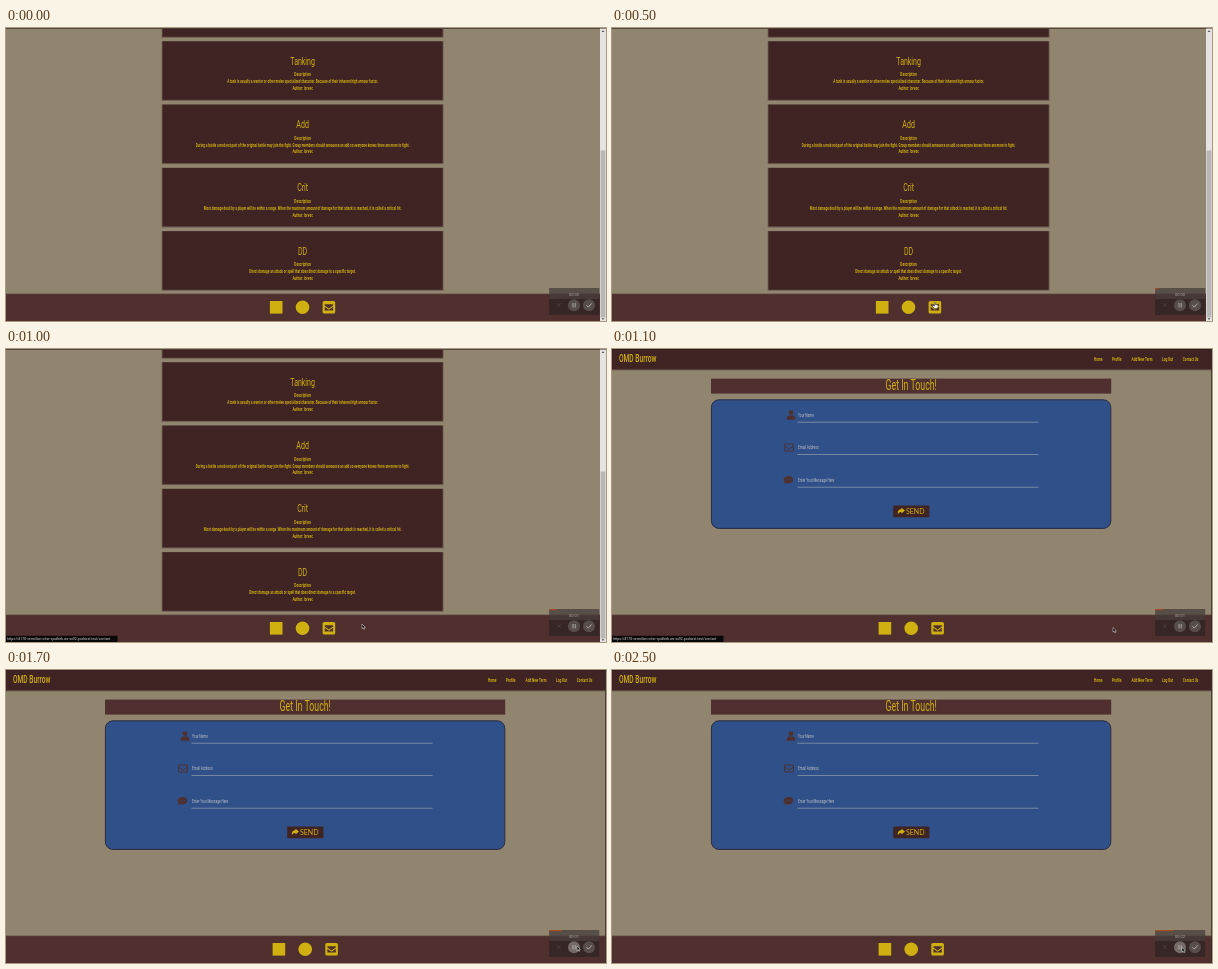
An HTML page for the animation above (2600 ms loop, 600 by 293 pixels).

```html
<!DOCTYPE html>
<html lang="en">
<head>
<meta charset="utf-8">
<title>Glossary and contact page</title>
<style>
html, body { margin: 0; width: 100%; height: 100%; overflow: hidden; background: #918570; }
svg { display: block; width: 100vw; height: 100vh; }
text { font-family: Roboto, "Liberation Sans", sans-serif; }
</style>
</head>
<body>
<svg id="stage" viewBox="0 0 600 293" preserveAspectRatio="none"></svg>
<script>
const LOOP = 2600, STEP = 100, PAGE_CHANGE = 1100;
const GOLD = '#d0b010', DARK = '#402424', BROWN = '#4f302e', TAN = '#918570';
const NARROW = 0.62; // one ratio for the condensed face

const rect = (x, y, w, h, fill, extra = '') =>
  `<rect x="${x}" y="${y}" width="${w}" height="${h}" fill="${fill}" ${extra}/>`;
const path = (d, extra) => `<path d="${d}" ${extra}/>`;
const label = (x, y, size, str, { fill = GOLD, weight = 400, anchor = 'middle' } = {}) =>
  `<text transform="translate(${x} ${y}) scale(${NARROW} 1)" font-size="${size}" font-weight="${weight}"
    fill="${fill}" text-anchor="${anchor}">${str}</text>`;

function footer(cx) {
  return rect(0, 266, 600, 27, BROWN) + rect(0, 265.6, 600, 0.7, '#5d463e')
    + rect(cx - 32.6, 273, 12.6, 12.6, GOLD)
    + `<circle cx="${cx}" cy="279.2" r="6.8" fill="${GOLD}"/>`
    + rect(cx + 20.1, 273, 12.6, 12.6, GOLD, 'rx="1.6"')
    + path(`M${cx + 22.2} 276.2h8.4v1.3l-4.2 2.9l-4.2-2.9z M${cx + 22.2} 278.8l4.2 2.9l4.2-2.9v3.7h-8.4z`,
      `fill="${BROWN}"`);
}

const terms = [
  ['Tanking', 'A tank is usually a warrior or other melee specialized character. Because of their inherent high armour factor.'],
  ['Add', 'During a battle a mob not part of the original battle may join the fight. Group members should announce an add so everyone knows there are more to fight.'],
  ['Crit', 'Most damage dealt by a player will be within a range. When the maximum amount of damage for that attack is reached, it is called a critical hit.'],
  ['DD', 'Direct damage an attack or spell that does direct damage to a specific target.']
];

function card(y, h) {
  return rect(155.6, y - 0.2, 282, h + 1.2, '#5d4c42', 'opacity=".6"') + rect(156.4, y, 280.3, h, DARK);
}

function termsPage() {
  const small = { weight: 600 };
  const cards = terms.map(([name, text], i) => {
    const y = 13.3 + i * 63.3;
    return card(y, 58.6)
      + label(296.6, y + 23.4, 11.3, name)
      + label(296.6, y + 35, 5.2, 'Description', small)
      + label(296.6, y + 41.9, 5, text, small)
      + label(296.6, y + 48.7, 5.2, 'Author: lorvec', small);
  }).join('');
  return rect(0, 0, 600, 293, TAN) + card(-5, 13.8) + cards + footer(296.5)
    + rect(0, 0, 600, 0.9, '#4b423b')
    + rect(594, 0.6, 6, 292.4, '#e6e4e2') + rect(594.6, 122.5, 4.8, 167, '#b9b7b6')
    + path('M595.6 4l1.4-1.8l1.4 1.8z M595.6 290.2l1.4 1.8l1.4-1.8z', 'fill="#55504d"');
}

const nav = [[482, 'Home'], [500, 'Profile'], [519.6, 'Add New Term'], [550, 'Log Out'], [570.8, 'Contact Us']];
const fields = ['Your Name', 'Email Address', 'Enter Your Message Here'];

function fieldIcons() {
  const ink = `fill="${BROWN}"`;
  return `<circle cx="179" cy="63.6" r="2.4" ${ink}/>`
    + path('M174.8 70.8v-1.4q0-2.9 2.9-2.9h2.6q2.9 0 2.9 2.9v1.4z', ink)
    + path('M172.6 95h8.8v7h-8.8z M172.6 97l4.4 3.2l4.4-3.2', `fill="none" stroke="${BROWN}" stroke-width=".9" stroke-linejoin="round"`)
    + path('M176.6 127c6 0 6 7.4 0 7.4q-1.5 0-2.4-.4q-1 .9-2.4 .8q1-.9 1-1.9c-2.6-2.5-.4-5.9 3.8-5.9z', ink)
    + [174.7, 176.7, 178.7].map(x => `<circle cx="${x}" cy="130.7" r=".5" fill="#2f5089"/>`).join('');
}

function contactPage() {
  const navText = nav.map(([x, s]) => label(x, 11.8, 5.1, s, { weight: 600, anchor: 'start' })).join('');
  const inputs = fields.map((s, i) => {
    const y = 67.6 + i * 32.5;
    return label(186, y, 5.2, s, { fill: '#c3c3c6', anchor: 'start' })
      + rect(185.5, y + 5.2, 241, 0.7, '#98a0ad');
  }).join('');
  return rect(0, 0, 600, 293, TAN)
    + rect(0, 20, 600, 1.4, '#6b5c4f') + rect(0, 0, 600, 20.4, DARK) + rect(0, 0, 600, 0.6, '#2c1a1a')
    + label(7, 13.4, 10.7, 'OMD Burrow', { weight: 500, anchor: 'start' }) + navText
    + rect(99, 29.6, 400.2, 15, BROWN) + label(299.2, 41, 14.2, 'Get In Touch!')
    + rect(99.4, 50.8, 399.4, 128.6, '#2f5089', 'rx="7.5" stroke="#2b2b40" stroke-width="1"')
    + inputs + fieldIcons()
    + rect(281.2, 156.4, 36.2, 11.8, DARK, 'rx="1"')
    + path('M286 165.2c-.6-3.6 1-5 3.4-5v-1.5l3.6 2.9l-3.6 2.9v-1.6c-1.8 0-2.8.6-3.4 2.3z', `fill="${GOLD}"`)
    + `<text x="294" y="164.9" font-size="7" fill="${GOLD}" style="font-family:Lato,sans-serif">SEND</text>`
    + footer(299.2) + rect(599.2, 0, 0.8, 293, '#3a302b');
}

function recorder() {
  return rect(543.2, 260, 50, 27, '#2a2220', 'opacity=".66"')
    + rect(543.2, 260, 50, 11, '#807873', 'opacity=".22"')
    + '<rect id="progress" x="543.2" y="260" height="1.2" fill="#a04c22"/>'
    + '<text id="clock" x="568" y="268" font-size="4" fill="#aaa4a0" text-anchor="middle"></text>'
    + path('M550.8 275.2l3.8 3.8m0-3.8l-3.8 3.8', 'stroke="#4f4744" stroke-width=".8"')
    + '<circle id="pause" cx="568" cy="277.2" r="6"/><circle cx="583" cy="277.2" r="6" fill="#574e4b"/>'
    + path('M567 275v4.4m2.2-4.4v4.4', 'stroke="#b5afab" stroke-width=".9"')
    + path('M580.5 277.3l1.8 1.8l3.4-3.7', 'fill="none" stroke="#c0bab7" stroke-width=".9"');
}

const pointers =
  '<g id="arrow">' + path('M0 0v4.6l1.1-1l.8 1.8l.8-.4l-.8-1.7h1.5z', 'fill="#000" stroke="#fff" stroke-width=".45"') + '</g>'
  + '<g id="hand">' + path('M-.6-2.4q.6-.8 1.1 0v2l2 .5q.7.2.6 1l-.5 2.2h-3.4l-2-2.4q.2-1 1.3-.3l.9.6z',
    'fill="#fff" stroke="#222" stroke-width=".45"') + '</g>';

const status = '<g id="status">' + rect(0, 286.8, 111.5, 6.2, '#080808')
  + '<text x="1" y="291.2" font-size="3.5" fill="#d8d8d8">https://4170-vermilion-otter-quolbek.ws-xx92.podnest.test/contact</text></g>';

document.getElementById('stage').innerHTML =
  `<g id="terms">${termsPage()}</g><g id="contact">${contactPage()}</g>${status}${recorder()}${pointers}`;

const el = id => document.getElementById(id);
const show = (id, on) => el(id).setAttribute('visibility', on ? 'visible' : 'hidden');

// time, x, y of the pointer tip
const trail = [
  [100, 596, 287], [400, 326, 278], [500, 323, 277], [900, 323, 277], [1000, 356, 275],
  [1100, 501, 278.5], [1200, 560, 278], [1300, 574, 277], [1500, 571, 276], [1800, 571, 276],
  [2000, 571, 276.5], [2300, 570, 277.5], [2600, 570, 277.5]
];

function pointerAt(t) {
  const i = Math.max(1, trail.findIndex(p => p[0] >= t));
  const [t0, x0, y0] = trail[i - 1], [t1, x1, y1] = trail[i];
  const k = Math.max(0, (t - t0) / (t1 - t0));
  return [x0 + (x1 - x0) * k, y0 + (y1 - y0) * k];
}

function draw(time) {
  const t = Math.floor((time % LOOP) / STEP) * STEP;
  const [x, y] = pointerAt(t);
  const onIcon = t >= 400 && t < 1000;
  show('terms', t < PAGE_CHANGE);
  show('contact', t >= PAGE_CHANGE);
  show('status', t >= 700 && t < 1300);
  show('arrow', t >= 100 && !onIcon);
  show('hand', onIcon);
  for (const id of ['arrow', 'hand']) el(id).setAttribute('transform', `translate(${x} ${y})`);
  el('progress').setAttribute('width', t * 0.0073);
  el('clock').textContent = '00:0' + Math.floor(t / 1000);
  el('pause').setAttribute('fill', t >= 1300 ? '#746b68' : '#574e4b');
}

const start = performance.now();
function tick() {
  draw(performance.now() - start);
  requestAnimationFrame(tick);
}
tick();
</script>
</body>
</html>
```
